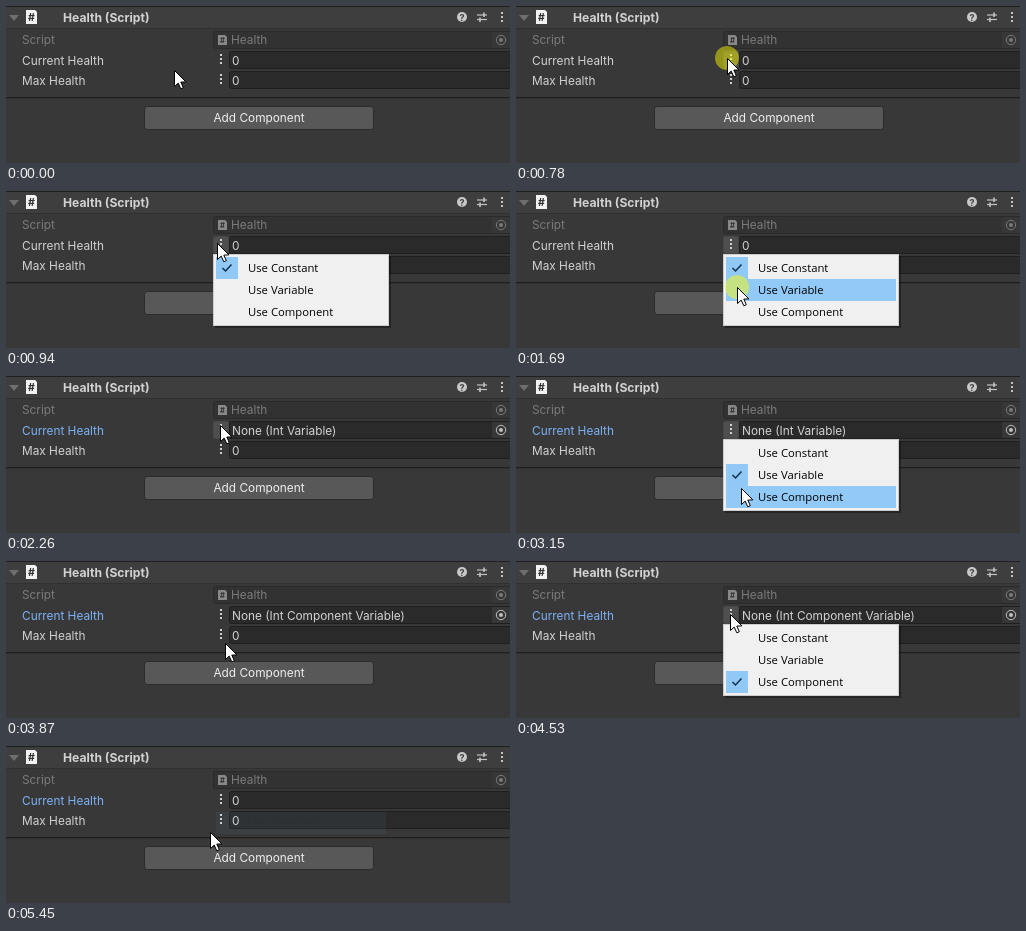
Animation of 504x157 px, one loop 5940 ms. Source, as an HTML page with a canvas:

```html
<!DOCTYPE html>
<html lang="en">
<head>
<meta charset="utf-8">
<title>Health component inspector</title>
<style>
  html, body { margin: 0; width: 100%; height: 100%; overflow: hidden; background: #383838; }
  canvas { display: block; }
</style>
</head>
<body>
<canvas id="stage" width="504" height="157"></canvas>
<script>
const ctx = document.getElementById('stage').getContext('2d');
const LOOP = 5940, LAST_CHANGE = 5450, FADE = 310;
const UI = 'Inter, sans-serif', MENU = '"Open Sans", sans-serif';
const BLUE = '#91c9f7', TEXT = '#d2d2d2', DIM = '#7b7b7b';
const ITEMS = ['Use Constant', 'Use Variable', 'Use Component'];
const VALUES = ['0', 'None (Int Variable)', 'None (Int Component Variable)'];

// Pointer stops: time, x, y
const PATH = [
  [0, 168, 64], [320, 168, 64], [580, 211, 52], [940, 211, 52], [1300, 221, 96],
  [1750, 221, 96], [2220, 214, 50], [2245, 214, 50], [2260, 214, 49], [2690, 214, 49],
  [3090, 225, 112], [3710, 225, 112], [4250, 214, 53], [4630, 214, 53],
  [4820, 216, 78], [5200, 216, 78], [5450, 204, 86], [LOOP, 204, 86]
];
const CLICKS = [780, 1630, 2520, 3380, 4350, 5110];
const MENUS = [
  { open: 800, close: 1700, checked: 0, pick: 1 },
  { open: 2540, close: 3470, checked: 1, pick: 2 },
  { open: 4370, close: 5180, checked: 2, pick: 0 }
];

function rect(x, y, w, h, color) {
  ctx.fillStyle = color;
  ctx.fillRect(x, y, w, h);
}

function box(x, y, w, h, r, fill, stroke) {
  ctx.beginPath();
  ctx.roundRect(x + .5, y + .5, w - 1, h - 1, r);
  ctx.fillStyle = fill;
  ctx.fill();
  ctx.strokeStyle = stroke;
  ctx.lineWidth = 1;
  ctx.stroke();
}

function text(str, x, y, color, font = '11.83px ' + UI, align = 'left') {
  ctx.font = font;
  ctx.textAlign = align;
  ctx.fillStyle = color;
  ctx.fillText(str, x, y);
}

function shape(points, fill) {
  ctx.beginPath();
  points.forEach(p => ctx.lineTo(...p));
  ctx.closePath();
  ctx.fillStyle = fill;
  ctx.fill();
}

function line(points, color, width) {
  ctx.beginPath();
  points.forEach(p => ctx.lineTo(...p));
  ctx.strokeStyle = color;
  ctx.lineWidth = width;
  ctx.stroke();
}

function disc(x, y, r, color) {
  ctx.beginPath();
  ctx.arc(x, y, r, 0, 7);
  ctx.fillStyle = color;
  ctx.fill();
}

function dots(x, y, color) {
  for (const d of [-4, 0, 4]) rect(x - 1, y + d - 1, 2, 2, color);
}

function picker(y, color) {
  rect(486, y - 8, 18, 16, '#373737');
  ctx.beginPath();
  ctx.arc(495, y, 4.7, 0, 7);
  ctx.strokeStyle = color;
  ctx.lineWidth = 1;
  ctx.stroke();
  disc(495, y, 2, color);
}

function scriptIcon(x, y, w, h, paper, ink) {
  shape([[x, y], [x + w - 2, y], [x + w, y + 2], [x + w, y + h], [x, y + h]], paper);
  text('#', x + w / 2, y + h / 2 + h * .27, ink, `bold ${h * .75}px ${UI}`, 'center');
}

function pointerAt(t) {
  const i = PATH.findIndex(p => p[0] > t);
  const [t0, x0, y0] = PATH[i - 1], [t1, x1, y1] = PATH[i];
  const left = 1 - (t - t0) / (t1 - t0);
  const k = 1 - left * left;
  return [Math.round(x0 + (x1 - x0) * k), Math.round(y0 + (y1 - y0) * k)];
}

function header() {
  rect(0, 0, 504, 23, '#3e3e3e');
  rect(0, 0, 504, 1, '#1f1f1f');
  rect(0, 22, 504, 1, '#303030');
  shape([[3, 9], [13, 9], [8, 15]], '#6e6e6e');
  scriptIcon(20, 4, 11, 14, '#f2f2f2', '#303030');
  text('Health (Script)', 57, 16, TEXT, 'bold 12.15px ' + UI);
  disc(456, 11, 5, '#c8c8c8');
  text('?', 456, 14.5, '#3e3e3e', 'bold 9px ' + UI, 'center');
  line([[471, 9], [481, 9]], '#c4c4c4', 1.2);
  line([[471, 13.5], [481, 13.5]], '#c4c4c4', 1.2);
  line([[478, 6.5], [478, 11]], '#c4c4c4', 1.6);
  line([[474, 11.5], [474, 16]], '#c4c4c4', 1.6);
  dots(496, 11, '#c4c4c4');
}

function row(label, y, value, focused, hot) {
  text(label, 16, y + 4, focused ? '#7db1f5' : TEXT);
  if (hot) box(207, y - 10, 16, 18, 2, '#4e4e4e', '#484848');
  dots(215, y - 2, '#d0d0d0');
  box(223, y - 10, 285, 18, 2, '#2a2a2a', '#1f1f1f');
  text(value, 226, y + 4, TEXT);
  if (value !== '0') picker(y - 1, '#c0c0c0');
}

function item(i, lit, checked) {
  const y = 66 + i * 22;
  if (lit) rect(210, y, 170, 22, BLUE);
  if (checked) {
    rect(210, y, 22, 22, '#90c8f6');
    line([[216.5, y + 11], [219.5, y + 14], [225.5, y + 7.5]], '#142f4d', 1.5);
  }
  text(ITEMS[i], 242, y + 15, '#000', '11.3px ' + MENU);
}

function menu(m, t, py) {
  ctx.globalAlpha = Math.min(1, (t - m.open) / 140);
  rect(209, 65, 176, 72, 'rgba(0,0,0,.35)');
  rect(207, 63, 176, 72, '#cccccc');
  rect(208, 64, 174, 70, '#f0f0f0');
  const over = Math.floor((py - 66) / 22);
  ITEMS.forEach((_, i) => item(i, i === over, i === m.checked));
  ctx.globalAlpha = 1;
}

function pointer(x, y) {
  ctx.save();
  ctx.translate(x + .5, y + .5);
  ctx.beginPath();
  [[0, 0], [0, 16], [3.7, 12.6], [6.3, 18.3], [8.8, 17.2], [6.3, 11.6], [11.4, 11.4]]
    .forEach(p => ctx.lineTo(...p));
  ctx.closePath();
  ctx.fillStyle = '#fff';
  ctx.fill();
  ctx.strokeStyle = '#000';
  ctx.lineWidth = 1;
  ctx.stroke();
  ctx.restore();
}

function draw(time) {
  const t = Math.min(time, LAST_CHANGE);
  const [px, py] = pointerAt(t);
  const open = MENUS.find(m => t >= m.open && t < m.close);
  const done = MENUS.filter(m => t >= m.close).pop();
  const near = y => !open && px >= 207 && px < 223 && Math.abs(py - y) < 6.5;

  rect(0, 0, 504, 157, '#383838');
  header();
  text('Script', 16, 38, DIM);
  box(207, 25, 301, 18, 2, '#323232', '#2a2a2a');
  scriptIcon(212, 29, 9, 10, '#888888', '#323232');
  text('Health', 225, 38, DIM);
  picker(34, DIM);
  row('Current Health', 55, VALUES[done ? done.pick : 0], !!done, open || near(55));
  row('Max Health', 75, '0', false, near(75));

  rect(0, 91, 504, 1, '#1f1f1f');
  rect(0, 92, 504, 1, '#303030');
  const over = !open && px >= 139 && px < 368 && py >= 100 && py < 124;
  box(138, 100, 230, 24, 3, over ? '#676767' : '#585858', '#2b2b2b');
  text('Add Component', 253, 116, '#eeeeee', undefined, 'center');

  if (open) menu(open, t, py);
  // The chosen item lingers briefly after its menu closes
  if (done && t < done.close + FADE) {
    ctx.globalAlpha = (1 - (t - done.close) / FADE) ** 1.5;
    item(done.pick, true, false);
    ctx.globalAlpha = 1;
  }
  if (CLICKS.some(c => t >= c && t < c + 90)) disc(px, py, 12, 'rgba(255,255,0,.47)');
  pointer(px, py);
}

const start = performance.now();
function tick() {
  draw((performance.now() - start) % LOOP);
  requestAnimationFrame(tick);
}
tick();
</script>
</body>
</html>
```
